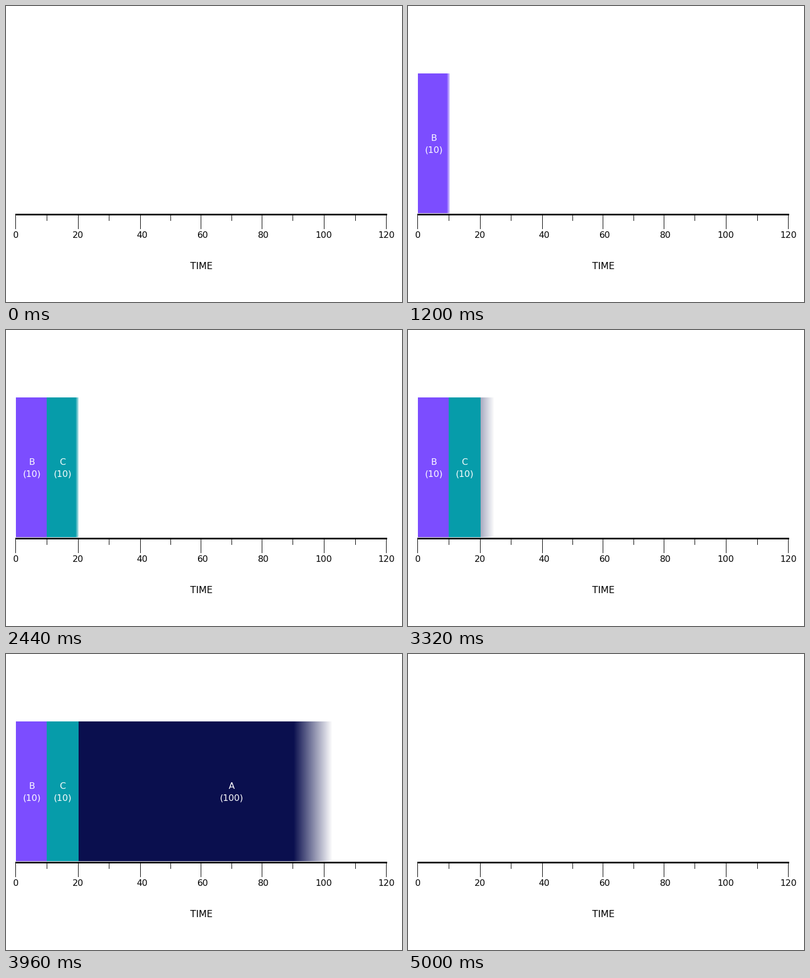
Recreate the animation shown at these times as a matplotlib script. Size 720x540 px, loop 5040 ms.

```python
import numpy as np
import matplotlib.pyplot as plt
from matplotlib.animation import FuncAnimation
from matplotlib.patches import Rectangle

W, H, DPI = 720, 540, 100
STEP, FRAMES = 40, 126
TOP, BOTTOM = 123, 378
AXIS_Y = 379

plt.rcParams["font.family"] = "DejaVu Sans"
fig = plt.figure(figsize=(W / DPI, H / DPI), dpi=DPI, facecolor="white")
ax = fig.add_axes([0, 0, 1, 1])
ax.axis("off")


def write(text, x, base, color="black", size=16):
    ax.text(x, base, text, color=color, fontsize=size * 72 / DPI,
            ha="center", va="baseline", zorder=5)


def box(x, y, w, h):
    ax.add_patch(Rectangle((x, y), w, h, fc="black", lw=0, zorder=4,
                           antialiased=False))


class Bar:
    """A block wiped in from the left behind a soft edge."""

    def __init__(self, name, time, x0, x1, color, label_x, start, lead, span):
        self.width = x1 - x0
        self.start, self.lead, self.span = start, lead, span
        self.pixels = np.zeros((1, self.width, 4))
        self.pixels[..., :3] = plt.matplotlib.colors.to_rgb(color)
        self.image = ax.imshow(self.pixels, extent=(x0, x1, BOTTOM, TOP),
                               aspect="auto", interpolation="nearest",
                               zorder=2)
        write(name, label_x, 246, "white")
        write(f"({time})", label_x, 267, "white")

    def draw(self, frame):
        alpha = 0
        if self.start <= frame < FRAMES - 1:
            soft = self.width / 8
            done = (frame - self.start + self.lead) / self.span
            front = done * (self.width + soft)
            x = np.arange(self.width) + 0.5
            alpha = np.clip((front - x) / soft, 0, 1)
        self.pixels[..., 3] = alpha
        self.image.set_data(self.pixels)


bars = [
    Bar("B", 10, 18, 76, "#7c4dff", 46.7, 20, 0.34, 11.3),
    Bar("C", 10, 74, 132, "#069caa", 102.8, 51, 0.34, 11.3),
    Bar("A", 100, 132, 693, "#0a0f4e", 409.9, 83, 0.92, 23.15),
]

# Time axis: long ticks with labels, short ticks halfway between them.
box(17, AXIS_Y, 676, 3)
ticks = np.array([17, 131, 244, 354.5, 465.5, 578.4, 691.7])
label_xs = [18, 130.5, 247, 358, 468, 578, 691.5]
for n, (x, label_x) in enumerate(zip(ticks, label_xs)):
    box(int(x), AXIS_Y, 1, 28)
    write(20 * n, label_x, 423)
for x in (ticks[:-1] + ticks[1:]) / 2:
    box(int(x), AXIS_Y, 1, 13)
write("TIME", 355, 480, size=17)

ax.set_xlim(0, W)
ax.set_ylim(H, 0)


def update(frame):
    for bar in bars:
        bar.draw(frame)
    return [bar.image for bar in bars]


anim = FuncAnimation(fig, update, frames=FRAMES, interval=STEP,
                     repeat=True, repeat_delay=0, blit=False)
plt.show()
```
